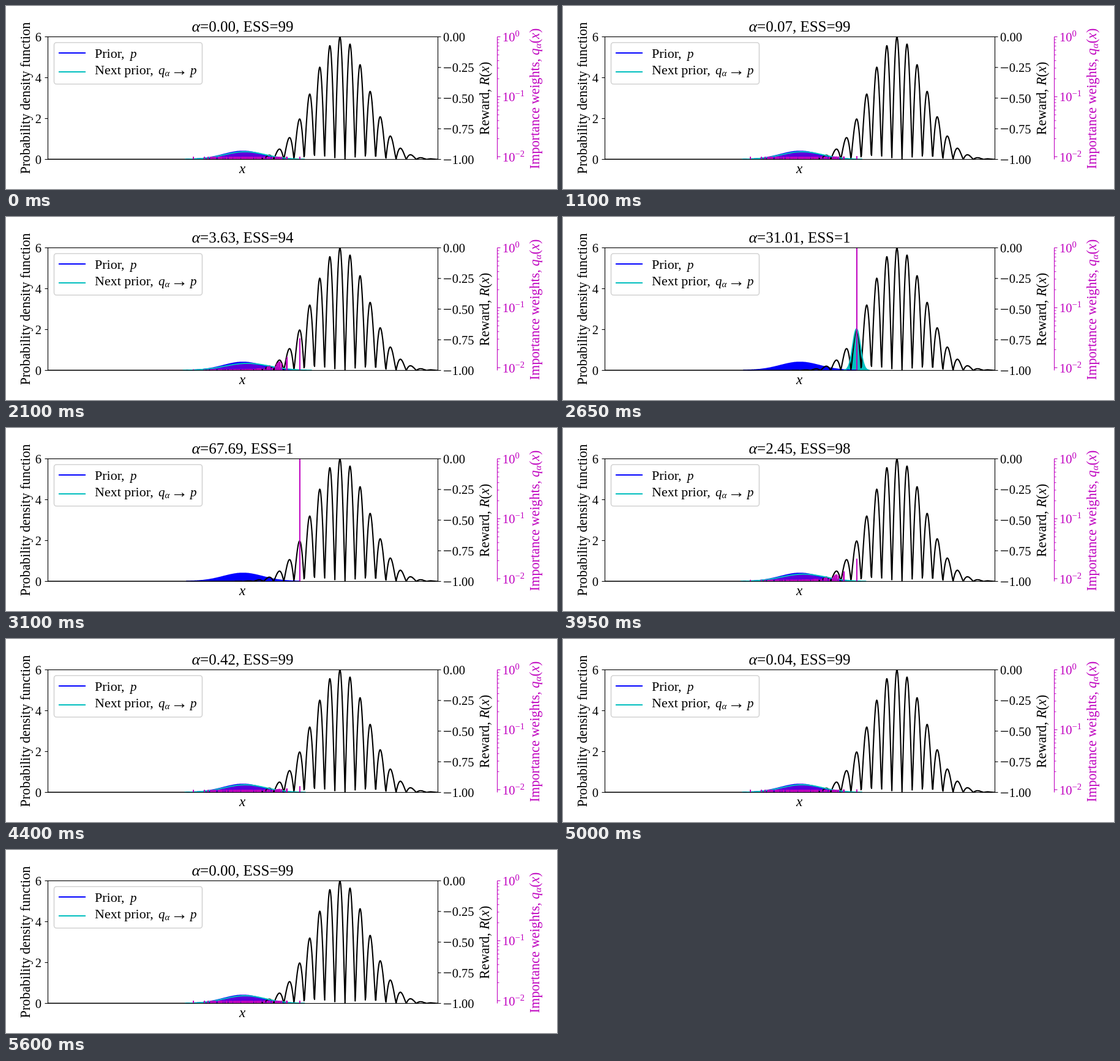
An HTML page with a canvas that plays this animation: 900x300 px, repeating every 6 s.

```html
<!DOCTYPE html>
<html lang="en">
<head>
<meta charset="utf-8">
<title>Importance weights</title>
<style>
  html, body { margin: 0; width: 900px; height: 300px; overflow: hidden; background: #fff; }
  canvas { display: block; }
</style>
</head>
<body>
<canvas id="stage" width="900" height="300"></canvas>
<script>
const ctx = document.getElementById('stage').getContext('2d');
const L = 68.5, R = 705.5, T = 50.5, B = 251.5, AX = 802.5;
const BLUE = '#0000ff', CYAN = '#00bfbf', MAGENTA = '#bf00bf', PURPLE = '#5a00dc';
const FONT = '"Liberation Serif", "Times New Roman", serif';
const STEP = 50, HALF = 60, FLOOR = 0.009, POINTS = 1000;

const px = x => L + (x + 10) / 20 * (R - L);
const py = d => B - d / 6 * (B - T);
const wy = w => T + Math.log(w) / Math.log(FLOOR) * (B - T);
const gauss = (x, m, s) => Math.exp(-((x - m) ** 2) / (2 * s * s)) / (s * Math.sqrt(2 * Math.PI));
const prior = x => gauss(x, 0, 1);
const gain = x => Math.abs(Math.sin(6 * x)) * Math.exp(-((x - 5) ** 2) / 4);
// Flat tails drop below the plot, so the baseline stays black.
const trim = fn => x => fn(x) < 0.006 ? -0.1 : fn(x);

const grid = Array.from({ length: POINTS }, (_, i) => -10 + 20 * i / (POINTS - 1));

// Tail samples are placed, the bulk follows jittered normal quantiles.
const probit = p => 4.91 * (p ** 0.14 - (1 - p) ** 0.14);
const samples = [-2.54, -1.975, 1.77, 1.83, 1.87, 1.9, 1.98, 2.23, 2.266, 2.918];
for (let i = 0; i < 90; i++) {
  samples.push(1.15 * probit(0.06 + 0.87 * i / 89) + 0.05 * Math.sin(i * i * 1.7));
}

function line(x1, y1, x2, y2, color, width) {
  ctx.strokeStyle = color;
  ctx.lineWidth = width;
  ctx.beginPath();
  ctx.moveTo(x1, y1);
  ctx.lineTo(x2, y2);
  ctx.stroke();
}

function trace(fn, toY) {
  ctx.beginPath();
  for (const x of grid) ctx.lineTo(px(x), Math.max(-50, toY(fn(x))));
}

function curve(fn, toY, color, width) {
  trace(fn, toY);
  ctx.strokeStyle = color;
  ctx.lineWidth = width;
  ctx.stroke();
}

function area(fn, color) {
  trace(fn, py);
  ctx.lineTo(R, B);
  ctx.lineTo(L, B);
  ctx.fillStyle = color;
  ctx.fill();
}

// Runs are [text, size, italic, rise].
function runs(list, x, y, align = 'left', color = '#000', angle = 0) {
  const setFont = ([, size, italic]) => { ctx.font = `${italic ? 'italic ' : ''}${size}px ${FONT}`; };
  const widths = list.map(r => { setFont(r); return ctx.measureText(r[0]).width; });
  const total = widths.reduce((a, b) => a + b, 0);
  ctx.save();
  ctx.translate(x, y);
  ctx.rotate(angle);
  ctx.fillStyle = color;
  let pos = align === 'center' ? -total / 2 : align === 'right' ? -total : 0;
  list.forEach((r, i) => {
    setFont(r);
    ctx.fillText(r[0], pos, -(r[3] || 0));
    pos += widths[i];
  });
  ctx.restore();
}

function drawAxes() {
  ctx.strokeStyle = '#000';
  ctx.lineWidth = 1.1;
  ctx.strokeRect(L, T, R - L, B - T);
  for (const v of [0, 2, 4, 6]) {
    line(L - 5, py(v), L, py(v), '#000', 1.1);
    runs([[String(v), 20.5]], 58, py(v) + 7.5, 'right');
  }
  for (let i = 0; i <= 4; i++) {
    const y = T + i * (B - T) / 4;
    const digits = [(i / 4).toFixed(2), 20.5];
    line(R, y, R + 5, y, '#000', 1.1);
    runs(i ? [['−', 26, false, -1.5], digits] : [digits], 714, y + 7.5);
  }
  line(AX, T, AX, B, MAGENTA, 1.1);
  for (let e = 0; e >= -2; e--) {
    const y = wy(10 ** e);
    line(AX, y, AX + 5, y, MAGENTA, 1.1);
    runs([['10', 20.5], [e ? '−' + -e : '0', 14.5, false, 8]], 811, y + 7.5, 'left', MAGENTA);
    for (let k = 2; k < 10 && e < 0; k++) {
      const ym = wy(k * 10 ** e);
      line(AX, ym, AX + 3, ym, MAGENTA, 0.9);
    }
  }
  const up = -Math.PI / 2;
  runs([['Probability density function', 22.3]], 39, 151, 'center', '#000', up);
  runs([['Reward, ', 22.5], ['R', 22.5, true], ['(', 22.5], ['x', 22.5, true], [')', 22.5]],
    789, 151.5, 'center', '#000', up);
  runs([['Importance weights, ', 22.2], ['q', 22.2, true], ['α', 15.5, true, -3], ['(', 22.2],
    ['x', 22.2, true], [')', 22.2]], 870.5, 152, 'center', MAGENTA, up);
  runs([['x', 23, true]], 386, 274, 'center');
}

function drawLegend() {
  ctx.beginPath();
  ctx.roundRect(78.5, 60, 242, 68, 4);
  ctx.fillStyle = '#fff';
  ctx.fill();
  ctx.strokeStyle = '#d2d2d2';
  ctx.lineWidth = 1.6;
  ctx.stroke();
  line(86, 77, 130, 77, BLUE, 2);
  line(86, 108, 130, 108, CYAN, 2);
  runs([['Prior, ', 22]], 145, 85);
  runs([['p', 21, true]], 203, 85);
  runs([['Next prior, ', 22]], 145, 112);
  runs([['q', 21, true], ['α', 15, true, -3]], 249, 112);
  runs([['→', 28, false, -1.5]], 269, 112);
  runs([['p', 21, true]], 301, 112);
}

function draw(alpha) {
  const raw = samples.map(x => Math.exp(alpha * gain(x)));
  const sum = raw.reduce((a, b) => a + b, 0);
  const w = raw.map(v => v / sum);
  const ess = 1 / w.reduce((a, v) => a + v * v, 0);
  const mean = w.reduce((a, v, i) => a + v * samples[i], 0);
  const sd = Math.sqrt(w.reduce((a, v, i) => a + v * (samples[i] - mean) ** 2, 0)) || 1e-6;
  const next = x => gauss(x, mean, sd);

  ctx.fillStyle = '#fff';
  ctx.fillRect(0, 0, 900, 300);

  ctx.save();
  ctx.beginPath();
  ctx.rect(L, T, R - L, B - T);
  ctx.clip();
  ctx.lineJoin = 'round';
  area(next, CYAN);
  area(prior, BLUE);
  area(x => Math.min(prior(x), next(x)), PURPLE);
  curve(trim(prior), py, BLUE, 2);
  curve(gain, v => B - v * (B - T), '#000', 2.1);
  curve(trim(next), py, CYAN, 2);
  samples.forEach((x, i) => {
    const top = wy(w[i]);
    if (top < B) line(px(x), B, px(x), top, MAGENTA, 2);
  });
  ctx.restore();

  drawAxes();
  drawLegend();
  runs([['α', 26, true], [`=${alpha.toFixed(2)}, ESS=${Math.floor(Math.min(ess, 99.999))}`, 25]],
    386.5, 42, 'center');
}

// Alpha sweeps logarithmically from 0.001 to 100 and back.
let shown = -1;
function tick(now) {
  const n = Math.floor(now / STEP) % (2 * HALF);
  const k = n < HALF ? n : 2 * HALF - 1 - n;
  if (k !== shown) {
    shown = k;
    draw(10 ** (-3 + 5 * k / (HALF - 1)));
  }
  requestAnimationFrame(t => tick(Math.max(0, t - start)));
}
const start = performance.now();
tick(0);
</script>
</body>
</html>
```
